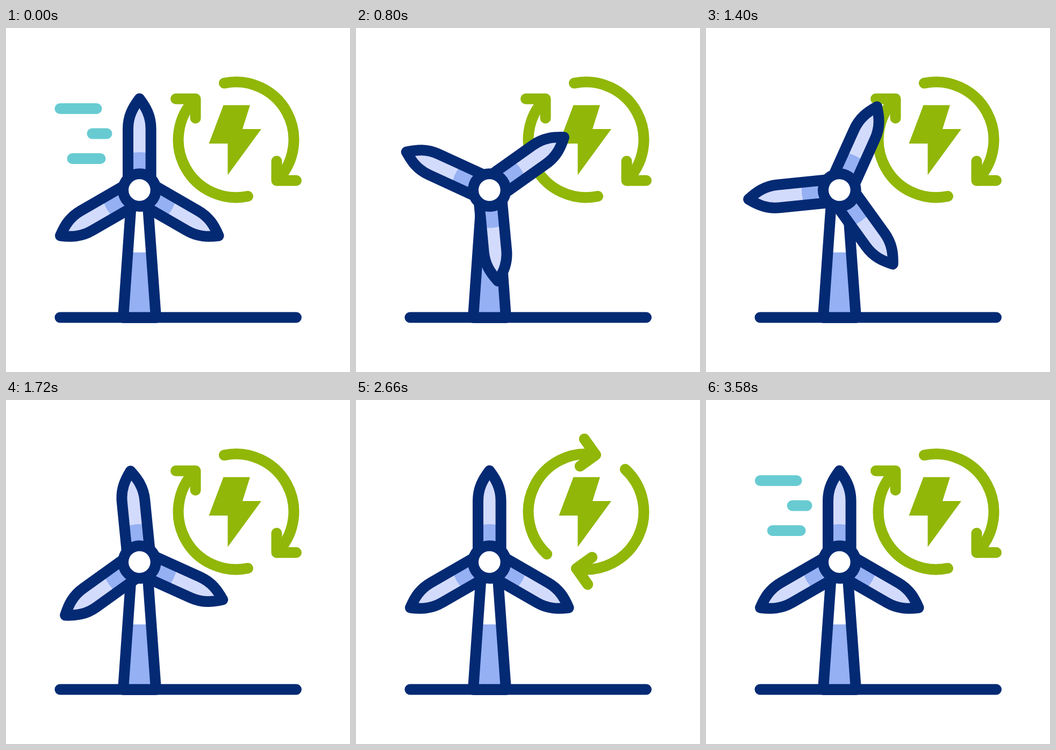
These frames come from a looping animation (640 px wide and 640 px high, 3.6 s). An HTML page:

```html
<!DOCTYPE html>
<html lang="en">
<head>
<meta charset="utf-8">
<title>Wind energy</title>
<style>
  html, body { margin: 0; width: 100%; height: 100%; overflow: hidden; background: #fff; }
  svg { display: block; width: 100vw; height: 100vh; }
  .navy { stroke: #042a74; stroke-width: 20; }
  .green { stroke: #91b708; stroke-width: 20; }
  .teal { stroke: #68cbd2; stroke-width: 20; }
</style>
</head>
<body>
<svg viewBox="0 0 640 640" fill="none" stroke-linecap="round" stroke-linejoin="round">
  <defs>
    <g id="arrow">
      <path d="M-22 -105.2A107.5 107.5 0 0 1 76 76"/>
      <path d="M75.5 40V76H112"/>
    </g>
    <g id="blade">
      <path fill="#d3dbfd" d="M-21.3 0V-114C-21.3 -138 -12 -154 0 -170C12 -154 21.3 -138 21.3 -114V0Z"/>
      <path fill="#95b0f3" d="M-21.3 0V-67A70 70 0 0 1 21.3 -67V0Z"/>
      <path class="navy" d="M-21.3 0V-114C-21.3 -138 -12 -154 0 -170C12 -154 21.3 -138 21.3 -114V0Z"/>
    </g>
  </defs>

  <g id="wind" class="teal"></g>

  <g id="ring" class="green">
    <use href="#arrow"/>
    <use href="#arrow" transform="rotate(180)"/>
  </g>
  <path id="bolt" fill="#91b708"/>

  <path fill="#fff" d="M235.5 290H261L279 539H218Z"/>
  <path fill="#95b0f3" d="M226.6 417.5H270.2L279 539H218Z"/>
  <path class="navy" d="M235.5 290H261L279 539H218Z"/>
  <path id="ground" class="navy"/>

  <g id="rotor">
    <use href="#blade"/>
    <use href="#blade" transform="rotate(120)"/>
    <use href="#blade" transform="rotate(240)"/>
    <circle r="30.3" fill="#fff" class="navy"/>
  </g>
</svg>
<script>
const LOOP = 3600;
const $ = id => document.getElementById(id);
const wind = $('wind'), ring = $('ring'), bolt = $('bolt'), ground = $('ground'), rotor = $('rotor');

const span = (t, a, b) => Math.min(1, Math.max(0, (t - a) / (b - a)));
const sine = p => (1 - Math.cos(Math.PI * p)) / 2;
const bump = (t, a, peak, b) => sine(t < peak ? span(t, a, peak) : 1 - span(t, peak, b));

// Cubic easing with handles (x1, 0) and (x2, 1)
function ease(p, x1, x2) {
  let lo = 0, hi = 1;
  for (let i = 0; i < 24; i++) {
    const s = (lo + hi) / 2, r = 1 - s;
    if (3 * x1 * s * r * r + 3 * x2 * s * s * r + s * s * s < p) lo = s;
    else hi = s;
  }
  return lo * lo * (3 - 2 * lo);
}

// Centre line of each gust; cut is the share already gone at 500 ms
const gusts = [
  { y: 150, right: 168.5, len: 68, cut: 0.34 },
  { y: 196.5, right: 187.5, len: 27, cut: 0.17 },
  { y: 243, right: 175.5, len: 52, cut: 0.31 }
];
for (const g of gusts) {
  g.el = document.createElementNS('http://www.w3.org/2000/svg', 'path');
  wind.append(g.el);
}

function drawWind(t) {
  const leaving = t < 620;
  const shown = leaving || t > 3130;
  wind.style.display = shown ? '' : 'none';
  if (!shown) return;
  const grow = sine(span(t, 3130, 3600));
  const shift = leaving ? -77 * sine(span(t, 0, 600)) : 18 * (1 - grow);
  for (const g of gusts) {
    const gone = g.cut * span(t, 380, 500) + (1 - g.cut) * span(t, 500, 620);
    const len = g.len * (leaving ? 1 - gone : grow);
    const x = g.right + shift;
    g.el.setAttribute('d', `M${x} ${g.y}H${x - len}`);
  }
}

function draw(t) {
  drawWind(t);

  const left = 100.5 - 46 * bump(t, 396, 560, 720);
  const right = 540 + 30 * bump(t, 420, 560, 720);
  ground.setAttribute('d', `M${left} 538.5H${right}`);

  const y = 301.5 - 21.5 * bump(t, 420, 560, 720);
  const turn = 720 * ease(span(t, 425, 2180), 0.471, 0.627);
  rotor.setAttribute('transform', `translate(248.3 ${y}) rotate(${turn})`);

  const spin = 360 * ease(span(t, 1840, 3203), 1 / 3, 2 / 3);
  ring.setAttribute('transform', `translate(428 207.8) rotate(${spin})`);

  const k = bump(t, 1840, 2110, 2400);
  const top = 143.5 + 10 * k, side = 9 * k;
  bolt.setAttribute('d', `M404.5 ${top}H${454 + side}L${440 + side} 188H${475 + side}` +
    `L412.5 ${273.5 - 19 * k}V215H377.5Z`);
}

function tick(now) {
  draw(Math.max(0, now) % LOOP);
  requestAnimationFrame(tick);
}
draw(0);
requestAnimationFrame(tick);
</script>
</body>
</html>
```
